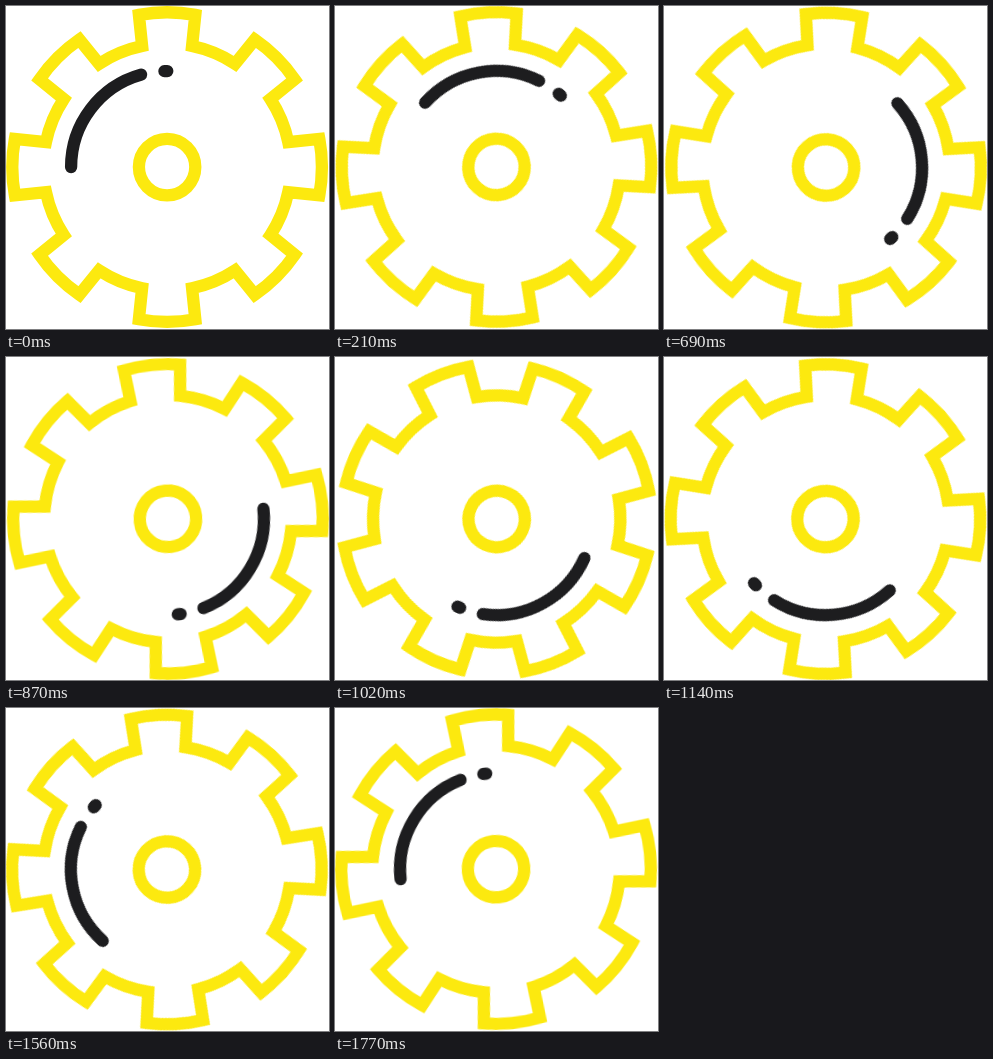
An HTML page for the animation above (1.8 s loop, 323 px wide and 323 px high).

```html
<!DOCTYPE html>
<html lang="en">
<head>
<meta charset="utf-8">
<title>Turning gear</title>
<style>
  html, body { margin: 0; width: 100%; height: 100%; overflow: hidden; background: #fff; }
  svg { display: block; width: 100vw; height: 100vh; }
  #wheel { transform-box: view-box; transform-origin: 161.5px 161.5px; fill: none; stroke-width: 12.3; }
  .body { stroke: #fce90f; stroke-miterlimit: 10; }
  .shine { stroke: #1d1d1f; stroke-linecap: round; }
</style>
</head>
<body>
<svg viewBox="0 0 323 323">
  <g id="wheel">
    <path id="gear" class="body"/>
    <circle class="body" cx="161.1" cy="161.1" r="28.2"/>
    <path id="arc" class="shine"/>
    <path id="dot" class="shine"/>
  </g>
</svg>
<script>
  const C = 161.1;
  const TIP = { r: 154.8, half: 10.5 };
  const ROOT = { r: 123.7, half: 11.65 };
  const SHINE = 96;

  const $ = id => document.getElementById(id);
  const point = (r, deg) => {
    const a = deg * Math.PI / 180;
    return (C + r * Math.cos(a)).toFixed(2) + ' ' + (C + r * Math.sin(a)).toFixed(2);
  };
  const arcTo = (r, deg) => `A${r} ${r} 0 0 1 ${point(r, deg)}`;
  const arc = (r, from, to) => `M${point(r, from)}${arcTo(r, to)}`;

  let d = '';
  for (let i = 0; i < 8; i++) {
    const mid = i * 45;
    d += (i ? 'L' : 'M') + point(ROOT.r, mid - ROOT.half)
      + 'L' + point(TIP.r, mid - TIP.half)
      + arcTo(TIP.r, mid + TIP.half)
      + 'L' + point(ROOT.r, mid + ROOT.half)
      + arcTo(ROOT.r, mid + 45 - ROOT.half);
  }
  $('gear').setAttribute('d', d + 'Z');
  $('arc').setAttribute('d', arc(SHINE, 180, 254.3));
  $('dot').setAttribute('d', arc(SHINE, 268.4, 270.1));

  // One turn in 60 steps of 6 degrees
  $('wheel').animate(
    [{ transform: 'rotate(0deg)' }, { transform: 'rotate(360deg)' }],
    { duration: 1800, iterations: Infinity, easing: 'steps(60, end)' }
  );
</script>
</body>
</html>
```
